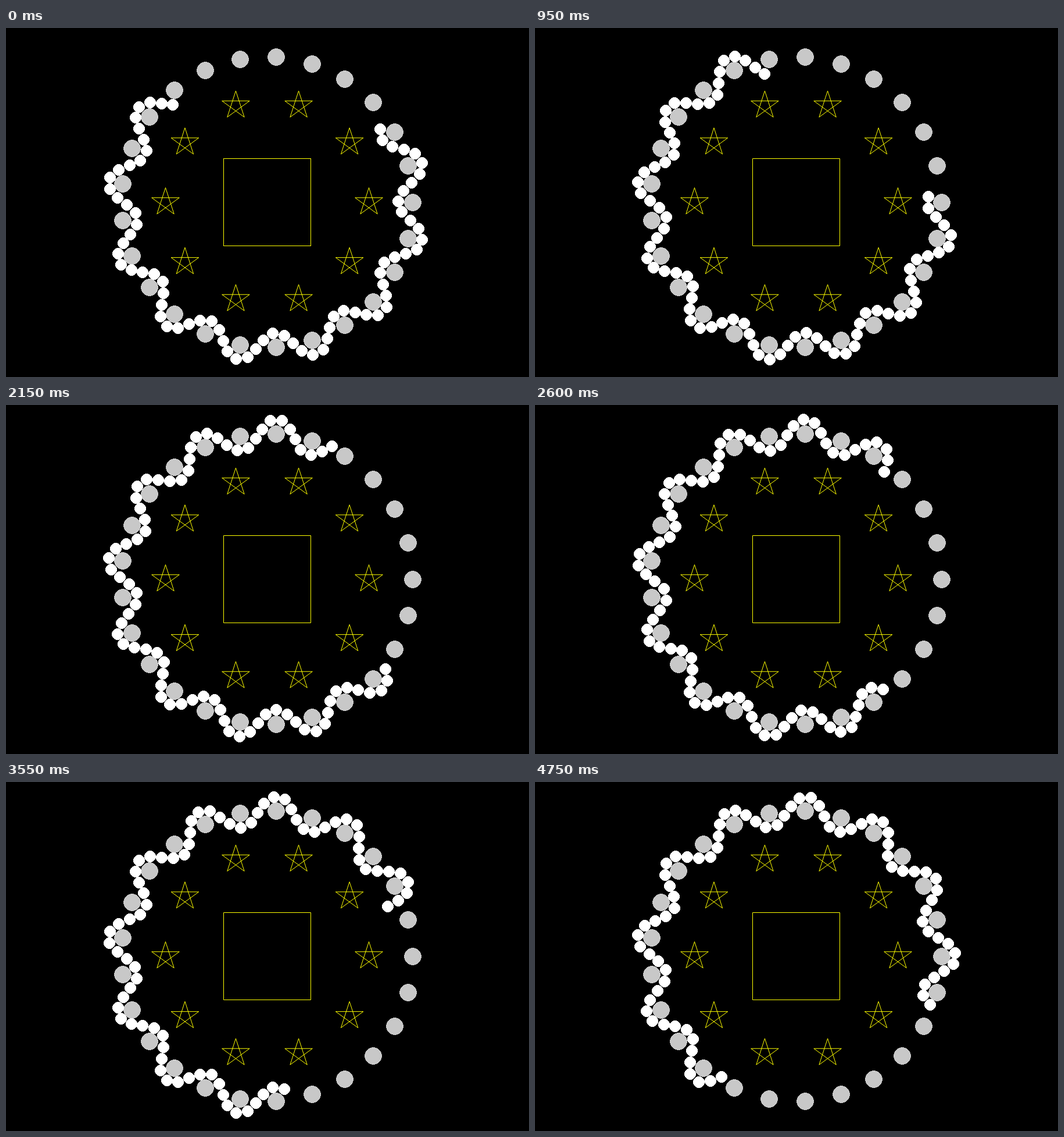
These frames come from a looping animation (900 by 600 pixels, 4.8 s). An HTML page with a canvas:

```html
<!DOCTYPE html>
<html>
<head>
<meta charset="utf-8">
<style>
html, body { margin: 0; height: 100%; overflow: hidden; background: #000; }
canvas { display: block; }
</style>
</head>
<body>
<canvas id="stage" width="900" height="600"></canvas>
<script>
const ctx = document.getElementById('stage').getContext('2d');
const { PI, floor, ceil, round, sin, cos, asin, atan2, hypot, min, max, sqrt } = Math;
const CX = 450, CY = 300, RING = 250, PEGS = 25, REACH = 24.75, SWING = 33;
const BEADS = 75, LINK = 20, STEP = 50, LOOP = 4800, SLICE = 2 * PI / PEGS;

const polar = (angle, r) => [CX + r * cos(angle), CY + r * sin(angle)];
const peg = k => polar(k * SLICE, RING);
const side = k => k % 2 ? 1 : -1; // odd pegs are passed on the outside
const wrap = a => a - 2 * PI * floor(a / (2 * PI));
const dist = (a, b) => hypot(b[0] - a[0], b[1] - a[1]);
const mix = (a, b, t) => [a[0] + (b[0] - a[0]) * t, a[1] + (b[1] - a[1]) * t];

// Poses of the leading bead: step, position counted in pegs, distance from the ring
const poses = [
  [0, 15.685, -17.3], [9, 16.764, 27.9], [29, 18.822, 25], [43, 20.56, 4.9],
  [52, 21.487, -10.6], [71, 23.456, -25.3], [95, 26.393, -5.1]
];

// Between two poses it swings past each peg at a steady speed
function headAt(step) {
  const i = max(1, poses.findIndex(p => p[0] >= step));
  const [t0, u0, d0] = poses[i - 1], [t1, u1, d1] = poses[i];
  const points = [polar(u0 * SLICE, RING + d0)];
  for (let k = ceil(u0); k < u1; k++) points.push(polar(k * SLICE, RING + side(k) * SWING));
  points.push(polar(u1 * SLICE, RING + d1));
  const lengths = points.slice(1).map((p, j) => dist(points[j], p));
  let left = lengths.reduce((a, b) => a + b) * (step - t0) / (t1 - t0), j = 0;
  while (j < lengths.length - 1 && left > lengths[j]) left -= lengths[j++];
  return mix(points[j], points[j + 1], left / lengths[j]);
}

const CROSS = asin(REACH / (RING * sin(SLICE / 2)));
// Direction of the tangent from peg k to the next one
const leave = k => (k + 0.5) * SLICE + PI / 2 + side(k) * CROSS;
const contact = (k, dir) => {
  const [x, y] = peg(k), a = dir - side(k) * PI / 2;
  return [x + REACH * cos(a), y + REACH * sin(a)];
};

// Taut string around the pegs, listed from the head backwards
function ropePath(head) {
  const [hx, hy] = head, first = 15;
  const passed = first + floor(wrap(atan2(hy - CY, hx - CX) - first * SLICE) / SLICE);
  let k = passed + 1, turn;
  for (; ; k--) {
    const [px, py] = peg(k), enter = leave(k - 1), [x, y] = contact(k, enter);
    const out = atan2(hy - py, hx - px) + side(k) * asin(min(1, REACH / dist(peg(k), head)));
    turn = wrap(side(k) * (out - enter) + PI / 2) - PI / 2;
    const ahead = (hx - x) * cos(enter) + (hy - y) * sin(enter) > 0;
    if (turn >= 0 && (ahead || k <= passed)) break;
  }
  const path = [head];
  const lineTo = p => {
    const from = path[path.length - 1], n = max(1, round(dist(from, p)));
    for (let i = 1; i <= n; i++) path.push(mix(from, p, i / n));
  };
  for (const end = k - 22; k > end; k--) {
    const enter = leave(k - 1);
    for (let i = 30; i >= 0; i--) lineTo(contact(k, enter + side(k) * turn * i / 30));
    turn = wrap(side(k - 1) * (enter - leave(k - 2)));
  }
  return path;
}

// Beads at equal straight distances along the string
function chain(path) {
  const beads = [path[0]];
  let last = path[0], before = 0;
  for (let i = 1; i < path.length && beads.length < BEADS; i++) {
    const gap = dist(last, path[i]);
    if (gap >= LINK) {
      last = mix(path[i - 1], path[i], (LINK - before) / (gap - before));
      beads.push(last);
      before = dist(last, path[i]);
    } else before = gap;
  }
  return beads;
}

// Hard-edged disc
function disc([x, y], r, color) {
  ctx.fillStyle = color;
  for (let row = 0; row < r; row++) {
    const half = max(round(sqrt(r * r - (row + 1) ** 2)), floor(sqrt(r * r - (row + 0.5) ** 2)));
    ctx.fillRect(floor(x) - half, floor(y) + row, 2 * half, 1);
    ctx.fillRect(floor(x) - half, floor(y) - row - 1, 2 * half, 1);
  }
}

function outlines() {
  ctx.strokeStyle = '#ff0';
  ctx.strokeRect(CX - 75.5, CY - 75.5, 150, 150);
  ctx.beginPath();
  for (let i = 0; i < 10; i++) {
    const [x, y] = polar(i * PI / 5, 175);
    for (let j = 0; j < 5; j++) {
      const a = j * 0.8 * PI - PI / 2;
      ctx[j ? 'lineTo' : 'moveTo'](x + 25 * cos(a) - 0.5, y + 25 * sin(a) - 0.5);
    }
    ctx.closePath();
  }
  ctx.lineJoin = 'bevel';
  ctx.stroke();
}

function draw(step) {
  ctx.fillStyle = '#000';
  ctx.fillRect(0, 0, 900, 600);
  outlines();
  for (let k = 0; k < PEGS; k++) disc(peg(k), 15, '#c8c8c8');
  for (const bead of chain(ropePath(headAt(step)))) disc(bead, 10, '#fff');
}

const start = performance.now();
let shown = -1;
function tick() {
  const step = floor((performance.now() - start) % LOOP / STEP);
  if (step !== shown) draw(shown = step);
  requestAnimationFrame(tick);
}
tick();
</script>
</body>
</html>
```
